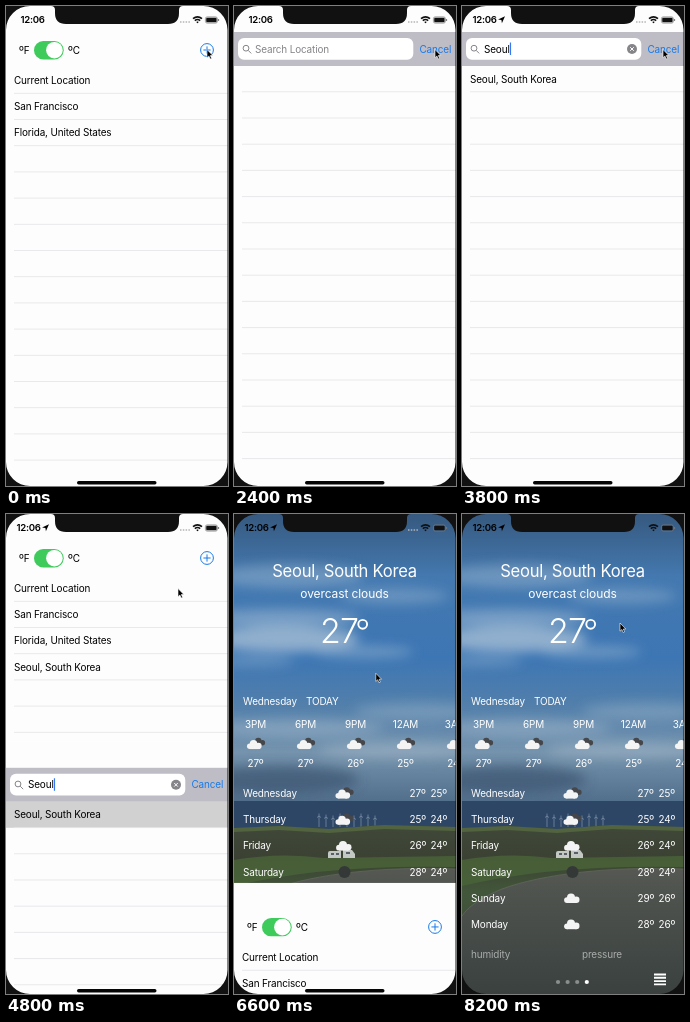
Animation, 222 px wide and 480 px high, one loop 8.3 s. Source, as an HTML page:

```html
<!DOCTYPE html>
<html lang="en">
<head>
<meta charset="utf-8">
<title>Weather locations</title>
<style>
  html, body { margin: 0; width: 100%; height: 100%; overflow: hidden; background: #111; }
  svg { display: block; width: 222px; height: 480px; }
  text { font: 9.95px Inter, "Open Sans", sans-serif; letter-spacing: -.15px; white-space: pre; }
  .mid { text-anchor: middle; }
  .blue { fill: #187bea; }
  .title { font-size: 16.6px; letter-spacing: -.27px; }
  .sky { font-size: 12px; letter-spacing: -.1px; }
  .temp { font-size: 34px; font-weight: 300; letter-spacing: -.8px; }
  .clock { font-size: 9.6px; font-weight: 600; letter-spacing: -.3px; }
</style>
</head>
<body>
<svg viewBox="0 0 222 480">
  <defs>
    <linearGradient id="air" x2="0" y2="1">
      <stop offset="0" stop-color="#36597f"/>
      <stop offset=".2" stop-color="#4479b0"/>
      <stop offset=".45" stop-color="#3d76b4"/>
      <stop offset=".6" stop-color="#527fab"/>
      <stop offset=".75" stop-color="#7593ad"/>
      <stop offset=".9" stop-color="#526f8c"/>
      <stop offset="1" stop-color="#4a6683"/>
    </linearGradient>
    <linearGradient id="land" x2="0" y2="1">
      <stop offset="0" stop-color="#40483a"/>
      <stop offset=".2" stop-color="#3b4233"/>
      <stop offset=".4" stop-color="#42573a"/>
      <stop offset="1" stop-color="#39423a"/>
    </linearGradient>
    <linearGradient id="road" x2="0" y2="1">
      <stop offset="0" stop-color="#555853"/>
      <stop offset=".4" stop-color="#494e4a"/>
      <stop offset="1" stop-color="#3a413f"/>
    </linearGradient>
    <filter id="soft" x="-50%" y="-100%" width="200%" height="300%"><feGaussianBlur stdDeviation="6"/></filter>
    <g id="puff">
      <circle cx="-5" cy="1.8" r="2.9"/><circle cx="-1" cy="-.9" r="4"/>
      <circle cx="4.2" cy="1.4" r="3.3"/><rect x="-5" y="0" width="9.4" height="4.7"/>
    </g>
    <g id="cloud"><use href="#puff" fill="#f4f4f4"/></g>
    <g id="broken">
      <use href="#puff" fill="#45474b" transform="translate(3.6 -2.4) scale(.8)"/>
      <use href="#puff" fill="#f4f4f4" transform="translate(-1 .6) scale(.95)"/>
    </g>
  </defs>

  <g id="weather">
    <rect width="222" height="318" fill="url(#air)"/>
    <g filter="url(#soft)" fill="#c9d6e0">
      <ellipse cx="55" cy="62" rx="75" ry="12" opacity=".3"/>
      <ellipse cx="160" cy="82" rx="55" ry="8" opacity=".28"/>
      <ellipse cx="45" cy="104" rx="80" ry="9" opacity=".4"/>
      <ellipse cx="50" cy="125" rx="75" ry="13" opacity=".6"/>
      <ellipse cx="130" cy="138" rx="50" ry="6" opacity=".35"/>
      <ellipse cx="20" cy="147" rx="40" ry="5" opacity=".3"/>
      <ellipse cx="185" cy="197" rx="65" ry="9" opacity=".25"/>
      <ellipse cx="60" cy="214" rx="90" ry="9" opacity=".3"/>
      <ellipse cx="165" cy="236" rx="80" ry="9" opacity=".28"/>
      <ellipse cx="45" cy="266" rx="80" ry="14" fill="#3c546f" opacity=".7"/>
    </g>
    <rect y="287" width="222" height="30" fill="#2d4666"/>
    <path id="turbines" stroke="#8fa2b6" stroke-width=".6" fill="none"/>
    <path d="M0 314L45 312 95 315 150 311 222 313V480H0z" fill="url(#land)"/>
    <path d="M0 314L45 312 95 315 150 311 222 313V317L150 315 95 319 45 316 0 318z" fill="#52633f"/>
    <path d="M0 346Q45 338 90 344L222 342V353Q90 350 0 372z" fill="#4a6439" opacity=".8"/>
    <path id="edge" d="M222 355C150 352 80 360 40 375 18 384 6 393 0 402V480H222z" fill="url(#road)"/>
    <path d="M222 355C150 352 80 360 40 375 18 384 6 393 0 402" fill="none" stroke="#6b6d64" opacity=".6"/>
    <path d="M94 339q0-2 2-2h11v7H94zM109 336h9l3 4v4h-12z" fill="#c3c8c5"/>
    <path d="M97 339h3v2h-3zM102 339h3v2h-3zM112 338h4v2h-4z" fill="#586166"/>
    <g id="report" fill="#fff"></g>
  </g>

  <g id="list">
    <rect width="222" height="480" fill="#fdfdfd"/>
    <rect id="pick" y="139.7" width="222" height="26.2" fill="#d1d1d2"/>
    <path id="listLines" stroke="#e7e7e9" stroke-width=".9"/>
    <text x="13" y="47.6">ºF</text><text x="62" y="47.6">ºC</text>
    <rect x="28" y="35" width="29.7" height="18.4" rx="9.2" fill="#3fcb5c"/>
    <circle cx="48.4" cy="44.2" r="8.3" fill="#fff"/>
    <g id="plus" fill="none" stroke="#187bea" stroke-width="1">
      <circle cx="201" cy="44" r="6.4"/><path d="M197.4 44h7.2M201 40.4v7.2"/>
    </g>
    <g id="places"></g>
  </g>

  <g id="search">
    <rect width="222" height="480" fill="#fdfdfd"/>
    <rect id="bar" y="26" width="222" height="34" fill="#bebcc4"/>
    <rect x="4" y="32" width="175.3" height="21.8" rx="6" fill="#fff"/>
    <g fill="none" stroke="#85858a"><circle cx="12" cy="42.2" r="2.9"/><path d="M14.2 44.4l3 3"/></g>
    <text id="hint" x="21" y="46.5" fill="#85858a">Search Location</text>
    <text id="query" x="22" y="46.5"></text>
    <rect id="caret" y="36.5" width="1.2" height="12.5" fill="#3478f6"/>
    <g id="clear"><circle cx="170" cy="43" r="5" fill="#85858a"/>
      <path d="M168.2 41.2l3.6 3.6M171.8 41.2l-3.6 3.6" stroke="#fff"/></g>
    <text class="blue" x="185.5" y="46.5">Cancel</text>
    <rect id="hit" y="60" width="222" height="26" fill="#d1d1d2"/>
    <path id="searchLines" stroke="#e7e7e9" stroke-width=".9"/>
    <g id="results"></g>
  </g>

  <text id="clock" class="clock" y="17.4">12:06</text>
  <path id="arrow" d="M43 10.2L36 13.4 39.4 13.9 39.9 17.3z"/>
  <path id="signal" d="M174 16h10" stroke="#b4b4b8" stroke-width="1.4" stroke-dasharray="1.5 1.3"/>
  <g fill="none" stroke="#111" stroke-width="1.6">
    <path d="M187 12.7q4.5-3.8 9 0M188.8 14.6q2.7-2.2 5.4 0"/><path d="M190.7 16.3h1.6"/>
  </g>
  <rect x="199.4" y="10.9" width="12" height="6.2" rx="1.8" fill="none" stroke="#777" stroke-width=".7"/>
  <rect x="200.2" y="11.7" width="10.4" height="4.6" rx="1" fill="#111"/>
  <path d="M212.6 13v2" stroke="#777"/>
  <rect id="home" x="71" y="475" width="79.5" height="3.4" rx="1.7" fill="#050505"/>
  <path fill="#111" fill-rule="evenodd" d="M0 0H222V480H0zM0 24V456A24 24 0 0 0 24 480H197.5A24 24 0 0 0 221.5 456V24A24 24 0 0 0 197.5 0H177Q173 0 173 4V7Q173 18 162 18H60Q49 18 49 7V4Q49 0 45 0H24A24 24 0 0 0 0 24z"/>
  <path id="mouse" d="M0 0V8.2L1.9 6.5 3.2 9.5 4.6 8.9 3.3 6H5.8z" fill="#000" stroke="#fff" stroke-width=".6"/>
</svg>
<script>
const LOOP = 8300, ROW = 26.2;
const $ = id => document.getElementById(id);
const show = (id, on) => $(id).style.display = on ? '' : 'none';
const clamp = x => Math.min(1, Math.max(0, x));
const shift = (id, x, y) => $(id).setAttribute('transform', `translate(${x} ${y})`);
const label = (x, y, s, cls = '', more = '') => `<text x="${x}" y="${y}" class="${cls}" ${more}>${s}</text>`;
const icon = (name, x, y) => `<use href="#${name}" x="${x}" y="${y}"/>`;
const column = (names, y) => names.map((s, i) => label(8, y + i * ROW, s)).join('');
const lines = y => Array.from({ length: 15 }, (_, i) => `M8 ${y + i * ROW}H222`).join('');
const slide = (t, start) => 480 * (1 - (1 - clamp((t - start) / 518)) ** 3);

const CITY = 'Seoul, South Korea';
const matches = [CITY, ...['Seosan', 'Seogwipo', 'Seocheon', 'Seongnam', 'Seongju', 'Seosaeng', 'Seorak']
  .map(s => s + ', South Korea'), ...['Seoni', 'Seohara', 'Seondha', 'Seorai', 'Seonath', 'Seopur', 'Seoli']
  .map(s => s + ', India')];

function buildReport() {
  let out = label(110.5, 62.5, CITY, 'mid title') + label(110.5, 84, 'overcast clouds', 'mid sky') +
    label(86, 129, '27', 'temp') +
    '<circle cx="128.7" cy="110.3" r="4.4" fill="none" stroke="#fff" stroke-width="1.9"/>' +
    label(9, 190.5, 'Wednesday') + label(72, 190.5, 'TODAY');
  [['3PM', 27], ['6PM', 27], ['9PM', 26], ['12AM', 25], ['3AM', 24]].forEach(([hour, deg], i) => {
    const x = 21.5 + i * 50;
    out += label(x, 213.8, hour, 'mid') + icon('broken', x, 230) + label(x, 252.5, deg + 'º', 'mid');
  });
  [['Wednesday', 27, 25, 'broken'], ['Thursday', 25, 24, 'broken'], ['Friday', 26, 24, 'cloud'],
   ['Saturday', 28, 24, ''], ['Sunday', 29, 26, 'cloud'], ['Monday', 28, 26, 'cloud']]
    .forEach(([day, hi, lo, sky], i) => {
      const y = 279.5 + i * ROW;
      out += label(9, y + 3.5, day) + label(175.5, y + 3.5, hi + 'º') + label(196.5, y + 3.5, lo + 'º') +
        (sky ? icon(sky, 110, y) : `<circle cx="110.5" cy="${y}" r="6" fill="#343937"/>`);
    });
  const dim = 'fill-opacity=".55"';
  out += label(9, 443.5, 'humidity', '', dim) + label(120, 443.5, 'pressure', '', dim);
  for (let i = 0; i < 4; i++)
    out += `<circle cx="${96 + i * 9.6}" cy="468" r="2.1" opacity="${i < 3 ? .4 : 1}"/>`;
  return out + '<path d="M192 460.5h12M192 463.8h12M192 467.1h12M192 470.4h12" stroke="#fff" stroke-width="1.9"/>';
}

$('report').innerHTML = buildReport();
$('turbines').setAttribute('d', Array.from({ length: 9 }, (_, i) => {
  const x = 85 + i * 7, y = 302 + i % 3;
  return `M${x} 313V${y}l-2 1.5M${x} ${y}l2 1.5M${x} ${y}v-2.5`;
}).join(''));
$('listLines').setAttribute('d', lines(87.3));
$('searchLines').setAttribute('d', lines(85.8));
$('places').innerHTML = column(['Current Location', 'San Francisco', 'Florida, United States', CITY], 78);
$('results').innerHTML = column(matches, 76.5);
const places = $('places').children, results = [...$('results').children];

// Pointer stops: time, x, y
const stops = [[0, 201, 43.5], [4000, 201, 43.5], [4500, 172, 74.5], [5300, 172, 74.5], [6200, 141, 154],
  [6500, 141, 154], [6900, 146, 187.5], [7200, 146, 187.5], [8100, 158, 109], [LOOP, 158, 109]];
function pointer(t) {
  const i = stops.findIndex(s => s[0] > t), [t0, x0, y0] = stops[i - 1], [t1, x1, y1] = stops[i];
  const p = (t - t0) / (t1 - t0), e = p * p * (3 - 2 * p);
  return [x0 + (x1 - x0) * e, y0 + (y1 - y0) * e];
}

const keys = [2700, 2900, 3000, 3200, 3300];
const caretDim = { 1000: .5, 1800: .5, 1900: 0, 2000: 0, 2100: .5, 2300: .5, 2400: 0, 2500: 0, 2600: 0 };

function render(t) {
  shift('mouse', ...pointer(t));

  const sheetY = t < 4700 ? 480 - slide(t, 100) : slide(t, 4700);
  show('search', sheetY < 480);
  shift('search', 0, sheetY);
  $('bar').setAttribute('opacity', .8 + .2 * clamp((t - 900) / 500));
  $('plus').setAttribute('opacity', t >= 100 && t < 300 ? .4 : 1);

  const typed = 'Seoul'.slice(0, keys.filter(k => t >= k).length);
  $('query').textContent = typed;
  show('hint', !typed);
  show('clear', typed);
  $('caret').setAttribute('x', typed ? 22.2 + $('query').getComputedTextLength() : 21);
  $('caret').setAttribute('opacity', t < 1000 ? 0 : caretDim[t] ?? 1);
  const count = t < 3000 ? 0 : t < 3700 ? matches.length : 1;
  results.forEach((r, i) => r.style.display = i < count ? '' : 'none');
  show('hit', t >= 4600);

  places[3].style.display = t >= 4700 ? '' : 'none';
  show('pick', t >= 6400);
  const listY = slide(t, 6400);
  show('list', listY < 480);
  shift('list', 0, listY);

  const located = t >= 3000;
  $('clock').setAttribute('x', located ? 10.5 : 14.5);
  show('arrow', located);
  show('signal', t < 6800);
  show('home', t < 6800);
}

function tick(now) {
  render(Math.floor(now % LOOP / 100) * 100);
  requestAnimationFrame(tick);
}
render(0);
requestAnimationFrame(tick);
</script>
</body>
</html>
```
